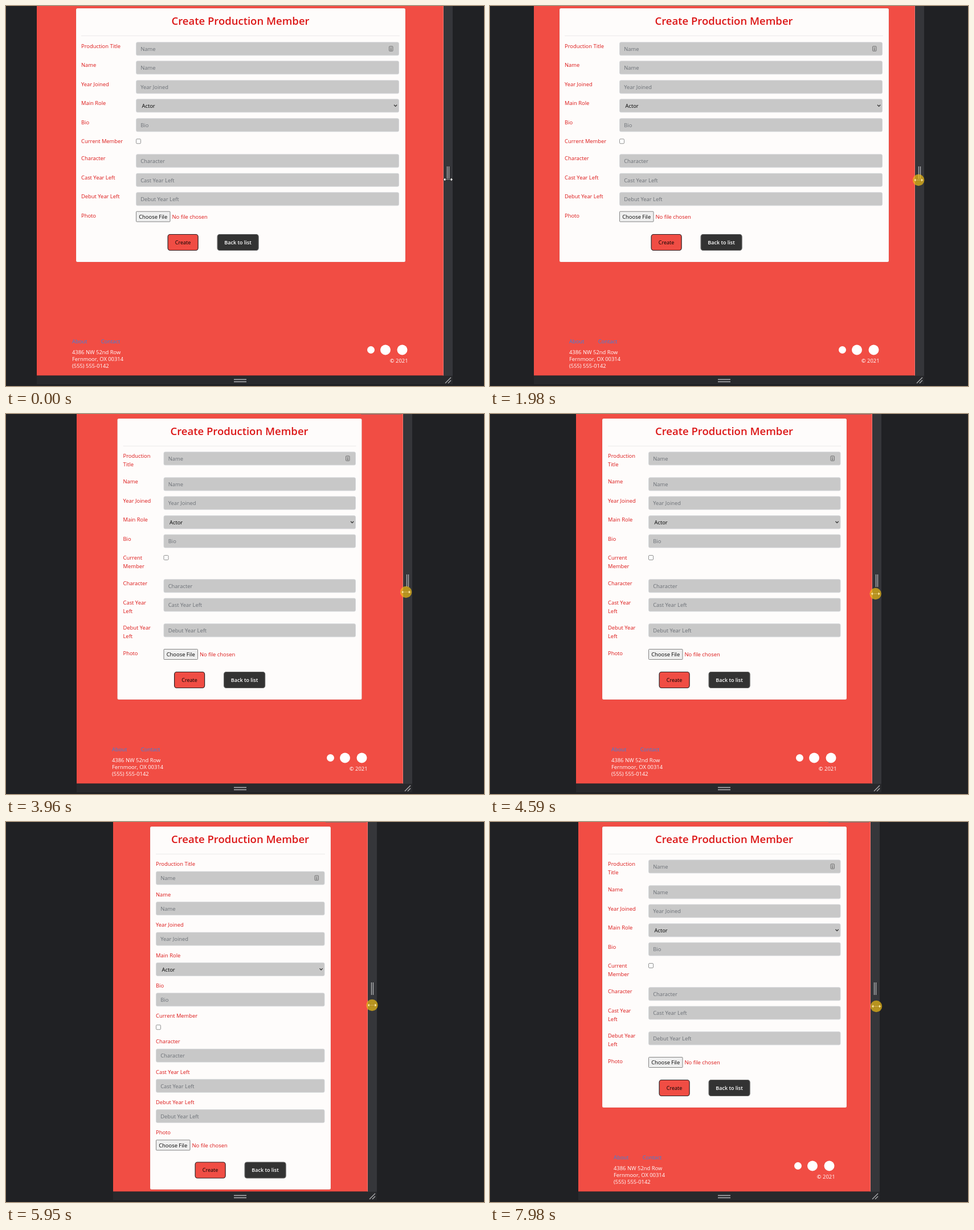
Animation of 839 by 668 pixels, one loop 8000 ms. Source, as an HTML page:

```html
<!DOCTYPE html>
<html lang="en">
<head>
<meta charset="utf-8">
<title>Responsive form</title>
<style>
  html, body { margin: 0; width: 100%; height: 100%; overflow: hidden; background: #202124; }
  svg { display: block; font: 9.4px "Open Sans", "Noto Sans", sans-serif; }
  .red { fill: #dc1616; }
  .hint { fill: #6c7076; }
  .link { fill: #3b82de; }
  .white { fill: #fff; }
  .title { font-size: 18.5px; font-weight: 600; }
  .button { font-size: 9px; }
  .strong { font-weight: 600; }
</style>
</head>
<body>
<svg id="stage" width="839" height="668" viewBox="0 0 839 668"></svg>
<script>
const LOOP = 8000, STEP = 68.6, PRESS = 760;

// Each drag: start time and number of steps after the first.
const drags = [[0, 0], [1220, 29], [3410, 37], [7010, 14]];

// time, page left, page right, form centre, pointer x, pointer y
const keys = [
  [1150, 54, 768, 412, 776, 305],
  [1980, 77, 746, 411, 752, 306],
  [2870, 100, 722, 412, 729, 309],
  [3210, 108, 714, 412, 722, 310],
  [3341, 108, 714, 412, 722, 310],
  [3960, 124, 697, 410, 702, 313],
  [4170, 134, 688, 411.5, 693, 314],
  [4990, 169, 653, 411.5, 660, 318],
  [5200, 173, 650, 411.5, 654, 318.5],
  [5950, 188, 635, 411.5, 642.5, 322],
  [6941, 188, 635, 411.5, 642.5, 322],
  [7770, 162, 661, 411.5, 670, 323],
  [7970, 155, 668, 411.5, 678, 324]
];

// Horizontal values are relative to the form centre; rows hold label centres.
const layouts = [
  { maxLeft: 104, half: 289, top: 4, bottom: 450, label: -280, field: -184, fieldEnd: 278,
    drop: 4.3, checkDrop: -.2, fileDrop: 1.7, create: -128.5, buttonY: 401.5,
    rows: [71, 104, 138, 171, 205, 238, 268, 301.5, 335, 368.5] },
  { maxLeft: 174, half: 214.5, top: 8, bottom: 502, label: -204.5, field: -133.5, fieldEnd: 204,
    drop: 4.3, checkDrop: -.5, fileDrop: 1.5, create: -115, buttonY: 453.5, wrap: true,
    rows: [74, 119, 152.2, 186, 219.2, 253, 298, 331.2, 376, 421] },
  { maxLeft: 999, half: 158.5, top: 8, bottom: 646, label: -148.5, field: -148.5, fieldEnd: 148,
    drop: 24.6, checkDrop: 19.8, fileDrop: 22, create: -80, buttonY: 598,
    rows: [74, 127.5, 181, 234.3, 287.7, 341, 386, 439.2, 492.5, 546] }
];

const labels = ["Production Title", "Name", "Year Joined", "Main Role", "Bio",
  "Current Member", "Character", "Cast Year Left", "Debut Year Left", "Photo"];
const wrapped = { "Production Title": ["Production", "Title"], "Current Member": ["Current", "Member"],
  "Cast Year Left": ["Cast Year", "Left"], "Debut Year Left": ["Debut Year", "Left"] };

const rect = (x, y, w, h, fill, more = "") =>
  `<rect x="${x}" y="${y}" width="${w}" height="${h}" fill="${fill}" ${more}/>`;
const text = (x, y, value, cls = "", anchor = "start") =>
  `<text x="${x}" y="${y}" class="${cls}" text-anchor="${anchor}">${value}</text>`;
const line = (d, color, width = 1) =>
  `<path d="${d}" fill="none" stroke="${color}" stroke-width="${width}"/>`;
const dot = (x, y, r, fill) => `<circle cx="${x}" cy="${y}" r="${r}" fill="${fill}"/>`;

function control(name, y, { field: x, fieldEnd, drop, checkDrop, fileDrop }) {
  if (name === "Current Member")
    return rect(x + .5, y + checkDrop - 4, 8, 8, "#fff", 'rx="1.5" stroke="#767676" stroke-width=".8"');
  if (name === "Photo") {
    const mid = y + fileDrop;
    return rect(x + .5, mid - 9, 59.5, 18, "#efefef", 'rx="1" stroke="#767676" stroke-width=".9"') +
      text(x + 30.2, mid + 3.5, "Choose File", "", "middle") +
      text(x + 63.5, mid + 3.5, "No file chosen", "red");
  }
  const mid = y + drop;
  let out = rect(x + .5, mid - 11.5, fieldEnd - x - 1, 23, "#c8c8c8",
    'rx="2.3" stroke="#d2d5d9" stroke-width=".8"');
  if (name === "Main Role")
    return out + text(x + 10.5, mid + 3.6, "Actor") +
      line(`M${fieldEnd - 9} ${mid - 1.5}l2.6 2.6 2.6-2.6`, "#333", 1.3);
  out += text(x + 8.2, mid + 3.8, name === "Production Title" ? "Name" : name, "hint");
  if (name === "Production Title") {
    const ix = fieldEnd - 17.5;
    out += rect(ix, mid - 4.5, 6.5, 8.5, "#bbb", 'rx="1" stroke="#777"') +
      line(`M${ix + 3.2} ${mid - 2.5}v4.5M${ix + 2} ${mid + 2}h2.5`, "#777");
  }
  return out;
}

function form(spec) {
  const { half, top, bottom, label, create, buttonY, rows } = spec;
  let out = rect(-half, top, half * 2, bottom - top, "#fefcfb",
      'rx="2.5" stroke="#000" stroke-opacity=".1" stroke-width=".7"') +
    text(-.5, top + 29, "Create Production Member", "title red", "middle") +
    line(`M${label} ${top + 48.3}H${half - 10}`, "#ebe9e9");
  labels.forEach((name, i) => {
    const lines = spec.wrap && wrapped[name] || [name];
    lines.forEach((part, n) => out += text(label, rows[i] + 3.3 + n * 15, part, "red"));
    out += control(name, rows[i], spec);
  });
  const back = create + 87;
  return out +
    rect(create + .6, buttonY, 53, 28, "#f04d44", 'rx="4" stroke="#2b2023" stroke-width="1.2"') +
    text(create + 27, buttonY + 17, "Create", "button", "middle") +
    rect(back + .6, buttonY, 72, 28, "#333", 'rx="4" stroke="#606060" stroke-width="1.2"') +
    text(back + 36.5, buttonY + 17, "Back to list", "button strong white", "middle");
}

const group = (id, content) => `<g id="${id}">${content}</g>`;
const stage = document.getElementById("stage");
stage.innerHTML =
  rect(0, 0, 839, 668, "#202124") +
  rect(0, 650, 0, 15, "#28292c", 'id="bottomBar"') +
  rect(0, 0, 0, 649.5, "#f14d44", 'id="page"') +
  group("footerLeft",
    text(62, 593, "About", "link") + text(112.7, 593, "Contact", "link") +
    text(62, 611.5, "4386 NW 52nd Row", "white") +
    text(62, 624.3, "Fernmoor, OX 00314", "white") +
    text(62, 636.3, "(555) 555-0142", "white")) +
  group("footerRight",
    dot(-127.5, 604.5, 6.5, "#fff") + dot(-102, 604.5, 9, "#fff") + dot(-72.5, 604.5, 9, "#fff") +
    text(-62.5, 627, '<tspan class="strong">©</tspan> 2021', "white", "end")) +
  group("menuEdge", rect(-74, 0, 71, 1, "#8d6468")) +
  layouts.map((spec, i) => group("form" + i, form(spec))).join("") +
  group("sideBar",
    rect(-1, 0, 1, 649.5, "#f3766f") + rect(0, 0, 16, 650, "#35363a") +
    rect(0, 650, 16, 15, "#28292c") +
    line("M6.5 282V304M9.5 282V304", "#b4b5b7", 1.3) +
    line("M3 663L13 653M8 663L13 658", "#b0b1b3", 1.3)) +
  line("M400 656.5H422M400 660.5H422", "#b4b5b7", 1.3) +
  group("pointer",
    '<circle id="press" r="10.2" fill="#f0bc14" fill-opacity=".7"/>' +
    '<path id="arrow" d="M-8.5 0l4-3.7v2.9h9v-2.9l4 3.7-4 3.7v-2.9h-9v2.9z" stroke-width=".8"/>');

const el = id => document.getElementById(id);
const move = (id, x, y = 0) => el(id).setAttribute("transform", `translate(${x} ${y})`);
const show = (id, on) => el(id).setAttribute("display", on ? "inline" : "none");
function span(id, from, to) {
  el(id).setAttribute("x", from);
  el(id).setAttribute("width", to - from);
}

function steppedTime(t) {
  const [start, count] = drags.filter(d => t >= d[0]).pop();
  return start + STEP * Math.min(count, Math.floor((t - start) / STEP));
}

function poseAt(t) {
  const next = keys.findIndex(k => k[0] > t);
  if (next === 0) return keys[0].slice(1);
  if (next < 0) return keys[keys.length - 1].slice(1);
  const a = keys[next - 1], b = keys[next], f = (t - a[0]) / (b[0] - a[0]);
  return a.slice(1).map((v, i) => v + (b[i + 1] - v) * f);
}

function draw() {
  const t = performance.now() % LOOP;
  const [rawLeft, rawRight, rawCentre, px, py] = poseAt(steppedTime(t));
  const left = Math.round(rawLeft), right = Math.round(rawRight);
  const centre = Math.round(rawCentre * 2) / 2;
  const active = layouts.findIndex(spec => left < spec.maxLeft);

  span("page", left, right);
  span("bottomBar", left, right + 16);
  move("footerLeft", left);
  for (const id of ["footerRight", "menuEdge", "sideBar"]) move(id, right);
  layouts.forEach((spec, i) => {
    show("form" + i, i === active);
    move("form" + i, centre);
  });
  show("footerLeft", active < 2);
  show("footerRight", active < 2);
  show("menuEdge", active > 0);

  const pressed = t >= PRESS;
  move("pointer", px, py);
  show("press", pressed);
  el("arrow").setAttribute("fill", pressed ? "#ffeb9c" : "#fff");
  el("arrow").setAttribute("stroke", pressed ? "#a67c14" : "#111");
  requestAnimationFrame(draw);
}
draw();
</script>
</body>
</html>
```
